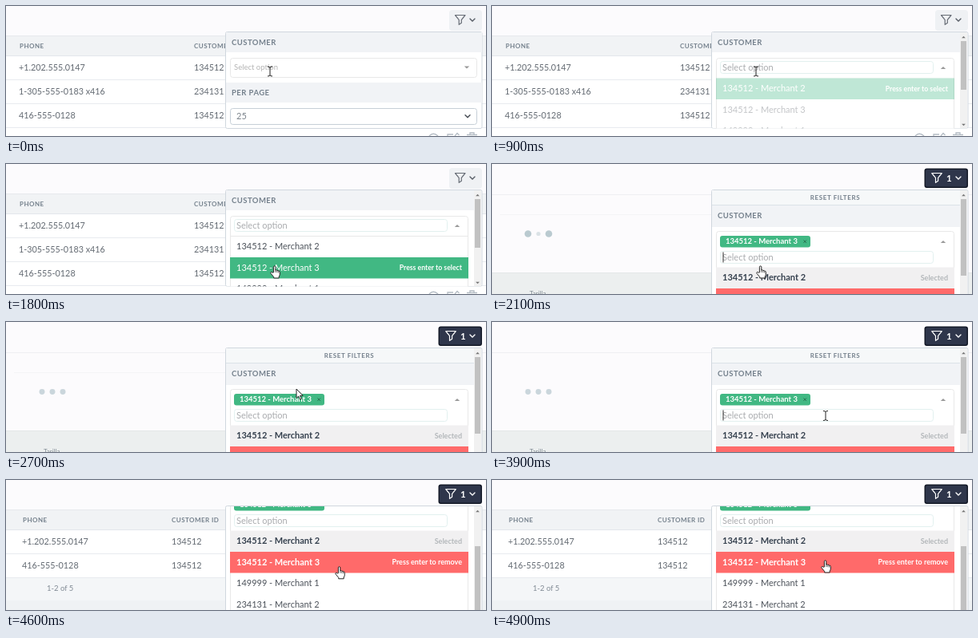
An HTML page for the animation above (5000 ms loop, 600 by 163 pixels).

```html
<!DOCTYPE html>
<html lang="en">
<head>
<meta charset="utf-8">
<title>Table filter</title>
<style>
  html, body { margin: 0; width: 100%; height: 100%; overflow: hidden; background: #fcfbfd; }
  svg { display: block; }
  text { font-family: Lato, "Open Sans", sans-serif; white-space: pre; }
</style>
</head>
<body>
<svg id="stage" width="600" height="163" viewBox="0 0 600 163"></svg>
<script>
const LOOP = 5000, STEP = 100, ROW = 26.5;
const GREEN = '#41b883', RED = '#ff6a6a', INK = '#646b73', HEAD = '#74808c', OPTION = '#4d535b';

// Markup helpers; text is placed by the middle of its capitals.
const rect = (x, y, w, h, fill, more = '') =>
  `<rect x="${x}" y="${y}" width="${w}" height="${h}" fill="${fill}" ${more}/>`;
const box = (x, y, w, h, stroke, r = 3, fill = '#fff') =>
  rect(x + .5, y + .5, w - 1, h - 1, fill, `stroke="${stroke}" rx="${r}"`);
const path = (d, fill, more = '') => `<path d="${d}" fill="${fill}" ${more}/>`;
const hline = (x1, x2, y, color) => rect(x1, y, x2 - x1, 1, color);
const label = (x, mid, str, size, fill, more = '') =>
  `<text x="${x}" y="${mid + size * .36}" font-size="${size}" fill="${fill}" ${more}>${str}</text>`;
const bold = 'font-weight="700"';
const caps = (x, mid, str, size = 9.5) =>
  label(x, mid, str, size, HEAD, `${bold} letter-spacing=".45"`);
const group = (id, body, more = '') => `<g id="${id}" ${more}>${body}</g>`;
const triangle = (x, y, up, color = '#999', w = 3.2) =>
  path(`M${x - w} ${y + (up ? w : -w) / 2}h${2 * w}l${-w} ${up ? -w : w}z`, color);
const funnel = (x, color) =>
  path(`M${x} 11.5h12.5l-4.7 5.8v4l-3.1 2v-6z`, 'none',
    `stroke="${color}" stroke-width="1.2" stroke-linejoin="round"`);
const chevron = (x, y, color, w = 3) =>
  path(`M${x - w} ${y - w / 2}l${w} ${w}l${w} ${-w}`, 'none',
    `stroke="${color}" stroke-width="1.4" stroke-linecap="round" stroke-linejoin="round"`);

// Background table
function table(left, col, rows) {
  let out = rect(0, 37, 600, 126, '#fff') + rect(0, 37, 600, 26, '#f1f3f5') +
    hline(0, 600, 37, '#e6e9ed') + hline(0, 600, 62, '#e3e7eb') +
    caps(left, 50, 'PHONE', 8) + caps(col, 50, 'CUSTOMER ID', 8);
  rows.forEach(([phone, id], i) => {
    const mid = 77.5 + i * 30;
    out += label(left - 1, mid, phone, 10.8, INK) + label(col, mid, id, 10.8, INK) +
      hline(0, 600, 92 + i * 30, '#e8ebef');
  });
  return out;
}
const rows = [
  ['+1.202.555.0147', '134512'],
  ['1-305-555-0183 x416', '234131'],
  ['416-555-0128', '134512']
];
const rowIcons = path('M529 163q5 -5.5 11 0M552 163v-2h7M561 163l3 -3.5l2.5 2.5M576 161.5h13M580 161v-2h5v2',
  'none', 'stroke="#b4bcc4" stroke-width="1.3"');
const fullTable = table(17, 235, rows) + rowIcons;
const shortTable = table(21, 207, [rows[0], rows[2]]) +
  rect(0, 123, 600, 28, '#f4f6f8') + rect(0, 151, 600, 12, '#eff2f4') +
  label(51, 136, '1-2 of 5', 9.5, '#808a94');

const loader = hline(0, 600, 38, '#eeeff2') + group('seam', hline(10, 275, 63, '#f4f4f6')) +
  rect(0, 137, 600, 26, '#ecefef') + hline(0, 600, 136, '#e4e7e8') +
  [45, 58, 71].map(x => `<circle class="dot" cx="${x}" cy="87.5" fill="#bacad0"/>`).join('') +
  label(47, 162, 'Tarilla', 8, '#7f8a92');

// Filter buttons
const idleButton = rect(554, 5, 41, 26, '#eff1f4', 'rx="4"') + funnel(561.5, '#666c75') + chevron(583, 17.5, '#555b64');
const activeButton = rect(540.5, 5.5, 54.5, 24.5, '#151a28', 'rx="3"') +
  rect(542, 7, 51.5, 21.5, '#2f364b', 'rx="2"') +
  funnel(549.8, '#fff') + label(568, 17.5, '1', 11.5, '#fff', bold) + chevron(583, 17.5, '#fff');

// Drop-down panel pieces
const frame = h => box(274, 32, 321.5, h, '#d0d7de', 2);
const band = (y, h, w = 320) => rect(275, y, w, h, '#f1f3f6');
const scrollbar = (bottom, thumbH) => rect(585, 33, 9, bottom - 33, '#f1f1f1') +
  triangle(589.5, 39, true, '#777', 2.4) +
  group('thumb' + thumbH, rect(586, 44, 7, thumbH, '#c1c1c1'));
const input = y => box(285, y, 267, 16, '#e2f0ef', 3);
const prompt = mid => label(288, mid, 'Select option', 11, '#a9abae');
const option = (mid, str, fill = OPTION, more = '') => label(288, mid, str, 11, fill, more);
const optionRow = (y, fill) => rect(280, y, 298, ROW, fill);
const hint = (mid, str, fill, size = 9) =>
  label(570, mid, str, size, fill, `${bold} text-anchor="end"`);

const closedPanel = frame(122) + band(33, 25) + caps(282, 45.5, 'CUSTOMER') +
  box(280, 65, 309, 25, '#e8e8e8') + label(285, 76.5, 'Select option', 9.5, '#b3b3b3') + triangle(576, 77, false) +
  band(96, 25) + caps(282, 108.5, 'PER PAGE') +
  box(280, 128, 309, 21, '#c6cfd7') + label(288, 138.3, '25', 11, '#7b838b') + chevron(577, 138.3, '#444a52');

const hot = (id, y) => group(id, optionRow(y, GREEN) + hint(y + 13, 'Press enter to select', '#fff', 8.7));
const openPanel = frame(122) + band(33, 25, 310) + caps(282, 45.5, 'CUSTOMER') +
  box(280, 65, 298, 100, '#e8e8e8') + input(69) + prompt(77) + triangle(564, 77.5, true) +
  group('list', hline(280, 578, 90, '#e8e8e8') + hot('hot0', 90.5) + hot('hot1', 90.5 + ROW) +
    group('opt0', option(103.5, '134512 - Merchant 2')) +
    group('opt1', option(130, '134512 - Merchant 3')) + option(156.5, '149999 - Merchant 1')) +
  scrollbar(153, 61) + triangle(589.5, 149, false, '#777', 2.4);

const scrolled =
  rect(275, 33, 310, 19, '#f6f8f9') + hline(275, 585, 51, '#dbe2e8') +
  label(429, 42, 'RESET FILTERS', 8, HEAD, `${bold} letter-spacing=".6" text-anchor="middle"`) +
  band(52, 27, 310) + caps(282, 65, 'CUSTOMER') +
  box(280, 84, 298, 180, '#e8e8e8') +
  rect(285, 90, 113, 14.5, GREEN, 'rx="3"') + label(292, 97, '134512 - Merchant 3', 9.5, '#fff', bold) +
  path('M389.5 95.5l3.4 3.4m0 -3.4l-3.4 3.4', 'none', 'stroke="#266d4d" stroke-width="1"') +
  triangle(564, 97.5, true) + input(109) + prompt(117) + group('caret', rect(288.5, 110.5, 1, 13, '#333')) +
  optionRow(129.5, '#f1f0f1') + option(142.3, '134512 - Merchant 2', '#35404e', bold) +
  hint(142.3, 'Selected', '#b3b7ba') +
  optionRow(129.5 + ROW, RED) + option(169, '134512 - Merchant 3', '#fff', bold) +
  hint(169, 'Press enter to remove', '#fff') +
  option(195.3, '149999 - Merchant 1') + option(221.7, '234131 - Merchant 2');
const pickedPanel = frame(140) + group('clip', group('content', scrolled), 'clip-path="url(#view)"') + scrollbar(163, 96);

// Pointers, drawn around their hot spots
const edge = 'stroke="#222" stroke-width="1" stroke-linejoin="round"';
const pointers = {
  beam: path('M-3 -6q2.6 0 3 1.2q.4 -1.2 3 -1.2M0 -5v10M-3 6q2.6 0 3 -1.2q.4 1.2 3 1.2', 'none',
    'stroke="#222" stroke-width="1"'),
  hand: path('M-1.6 8V1.2q0 -1.3 1.2 -1.3t1.2 1.3V5q1.8 -.7 2 .6q1.7 -.6 1.9 .7q1.6 -.4 1.6 1.2V10q0 2 -1.1 3.2V15H-1.3V13.6L-4.8 9.4q-.9 -1.3 .1 -1.8q.9 -.4 1.9 .7z', '#fff', edge) +
    path('M.8 5v3M2.8 5.8v2.4M4.7 6.5v2', 'none', 'stroke="#222" stroke-width=".7"'),
  arrow: path('M0 0v11.5l2.7 -2.5l1.9 4.2l1.9 -.9l-1.9 -4h3.6z', '#fff', edge)
};

const stage = document.getElementById('stage');
stage.innerHTML = '<clipPath id="view"><rect x="275" y="33" width="310" height="130"/></clipPath>' +
  '<clipPath id="short"><rect x="270" y="30" width="330" height="123.5"/></clipPath>' +
  rect(0, 0, 600, 163, '#fcfbfd') +
  group('fullTable', fullTable) + group('loader', loader) + group('shortTable', shortTable) +
  group('idle', idleButton) + group('active', activeButton) +
  group('closed', closedPanel) + group('open', openPanel, 'clip-path="url(#short)"') + group('picked', pickedPanel) +
  Object.entries(pointers).map(([id, body]) => group(id, body)).join('');

const el = id => document.getElementById(id);
const dots = document.querySelectorAll('.dot');
const show = (id, on) => el(id).setAttribute('display', on ? 'inline' : 'none');

// time, x, y, pointer
const moves = [
  [0, 330, 82, 'beam'], [1200, 330, 82, 'beam'], [1300, 331, 87, 'beam'], [1400, 334, 102, 'hand'],
  [1500, 335, 113, 'hand'], [1800, 336, 128, 'hand'], [2300, 336, 128, 'hand'],
  [2500, 350, 107, 'arrow'], [2700, 363, 84, 'arrow'], [2900, 376, 98, 'arrow'],
  [3100, 398, 118, 'beam'], [3200, 406, 126, 'hand'], [3400, 412, 128, 'hand'],
  [3600, 415, 124, 'beam'], [3800, 417, 121, 'beam'], [4000, 417, 114, 'hand'],
  [4400, 417, 114, 'hand'], [4900, 417, 101, 'hand'], [LOOP, 417, 101, 'hand']
];
const scrolls = [[0, 0], [3900, 0], [4100, 66], [LOOP, 66]];
const fades = [[0, 0], [800, 0], [1100, 1], [LOOP, 1]];
const caretOn = [[2100, 2600], [3100, 3500], [3800, 4300]];

function at(keys, t) {
  const i = keys.findIndex((k, n) => n + 1 === keys.length - 1 || t < keys[n + 1][0]);
  const a = keys[i], b = keys[i + 1], p = (t - a[0]) / (b[0] - a[0]);
  return a.map((v, n) => typeof v === 'number' ? v + (b[n] - v) * p : v);
}

function draw(t) {
  const picked = t >= 2100, loaded = t >= 4600;
  show('fullTable', !picked);
  show('loader', picked && !loaded);
  show('shortTable', loaded);
  show('idle', !picked);
  show('active', picked);
  show('closed', t < 900);
  show('open', t >= 900 && !picked);
  show('picked', picked);
  show('seam', t < 3900);

  el('list').setAttribute('opacity', at(fades, t)[1]);
  const second = t >= 1600;
  show('hot0', !second);
  show('hot1', second);
  ['opt0', 'opt1'].forEach((id, i) =>
    el(id).firstChild.setAttribute('fill', second === !!i ? '#fff' : OPTION));

  const y = at(scrolls, t)[1];
  el('content').setAttribute('transform', `translate(0 ${-y})`);
  el('thumb96').setAttribute('transform', `translate(0 ${y * .59})`);
  show('caret', caretOn.some(([from, to]) => t >= from && t < to));

  // Outer dots shrink while the middle one grows, then back.
  const swing = Math.abs(((t + 300) % 800) / 400 - 1);
  dots.forEach((dot, i) => {
    const p = i === 1 ? 1 - swing : swing;
    dot.setAttribute('r', 2.6 + 1.7 * p);
    dot.setAttribute('opacity', .5 + .5 * p);
  });

  const [, px, py, kind] = at(moves, t);
  for (const id in pointers) show(id, id === kind);
  el(kind).setAttribute('transform', `translate(${px} ${py})`);
}

const start = performance.now();
function tick() {
  const t = (performance.now() - start) % LOOP;
  draw(Math.floor(t / STEP) * STEP);
  requestAnimationFrame(tick);
}
tick();
</script>
</body>
</html>
```
